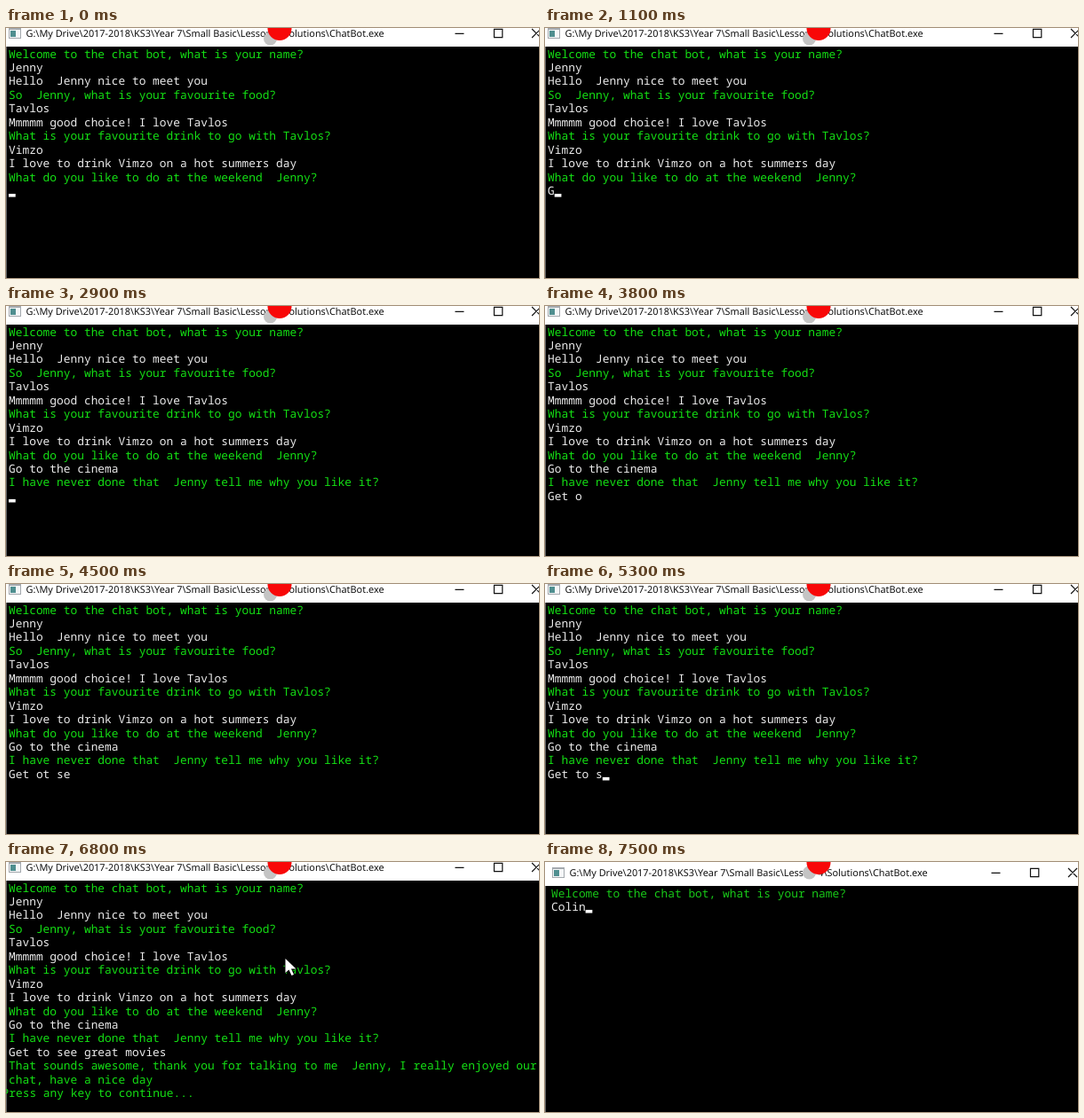
Animation of 600 by 282 pixels, one loop 7600 ms. Source, as an HTML page with a canvas:

```html
<!DOCTYPE html>
<html lang="en">
<head>
<meta charset="utf-8">
<title>Chat bot console</title>
<style>
  html, body { margin: 0; width: 100%; height: 100%; overflow: hidden; background: #000; }
  canvas { display: block; }
</style>
</head>
<body>
<canvas id="stage" width="600" height="282"></canvas>
<script>
const ctx = document.getElementById('stage').getContext('2d');
const LOOP = 7600, CELL = 7.72, ROW = 15.45;
const RESTART = 6900, BLINK = 1060, BLINK_START = 700;
const WHITE = '#ececec';

const TITLE = 'G:\\My Drive\\2017-2018\\KS3\\Year 7\\Small Basic\\Lesson 4\\Solutions\\ChatBot.exe';
const GREETING = '>Welcome to the chat bot, what is your name?';

// Lines starting with ">" are spoken by the bot in green.
const HISTORY = [
  GREETING,
  'Jenny',
  'Hello  Jenny nice to meet you',
  '>So  Jenny, what is your favourite food?',
  'Tavlos',
  'Mmmmm good choice! I love Tavlos',
  '>What is your favourite drink to go with Tavlos?',
  'Vimzo',
  'I love to drink Vimzo on a hot summers day',
  '>What do you like to do at the weekend  Jenny?'
];

const POINTER = new Path2D('M0 0V16L4 12.5L7 19L9.5 18L6.5 11.5H12Z');

// Piecewise linear value through [time, value] points.
function ramp(t, points) {
  if (t <= points[0][0]) return points[0][1];
  for (let i = 1; i < points.length; i++) {
    const [t0, v0] = points[i - 1], [t1, v1] = points[i];
    if (t < t1) return v0 + (v1 - v0) * (t - t0) / (t1 - t0);
  }
  return points[points.length - 1][1];
}

const typed = (text, t, ...points) => text.slice(0, Math.floor(ramp(t, points)));

function linesAt(t) {
  if (t >= RESTART) return [GREETING, typed('Colin', t, [7000, 0], [7450, 5])];

  const lines = [...HISTORY, typed('Go to the cinema', t, [1000, 0], [2100, 11.4], [2400, 16])];
  if (t < 2500) return lines;

  lines.push('>I have never done that  Jenny tell me why you like it?');
  lines.push(t < 5000
    ? typed('Get ot se', t, [3100, 0], [4350, 9], [4600, 9], [5000, 4])
    : typed('Get to see great movies', t, [5000, 4], [6150, 23]));
  if (t < 6400) return lines;

  return lines.concat(
    '>That sounds awesome, thank you for talking to me  Jenny, I really enjoyed our',
    '>chat, have a nice day',
    '>Press any key to continue...');
}

function rect(color, x, y, w, h) {
  ctx.fillStyle = color;
  ctx.fillRect(x, y, w, h);
}

function disc(color, x, y, r) {
  ctx.fillStyle = color;
  ctx.beginPath();
  ctx.arc(x, y, r, 0, Math.PI * 2);
  ctx.fill();
}

function drawTitleBar(restarted) {
  const dx = restarted ? 5 : 0, dy = restarted ? 6 : 0, bx = restarted ? -3 : 0;
  rect('#fff', 0, 0, 600, 21 + dy);

  rect('#a4a9ae', 3 + dx, dy, 14, 12);
  rect('#f4f6f7', 4 + dx, 2 + dy, 12, 9);
  rect('#4f8f90', 5 + dx, 3 + dy, 6, 7);

  ctx.font = '500 10.9px "Noto Sans", sans-serif';
  ctx.fillStyle = '#111';
  ctx.fillText(TITLE, 22.5 + dx, 10 + dy);

  ctx.strokeStyle = '#111';
  ctx.lineWidth = 1.2;
  ctx.beginPath();
  ctx.moveTo(505.5 + bx, 6.3 + dy);
  ctx.lineTo(515.5 + bx, 6.3 + dy);
  ctx.rect(549.5 + bx, 1.3 + dy, 9.3, 9.3);
  ctx.moveTo(592 + bx, 1 + dy);
  ctx.lineTo(602 + bx, 11 + dy);
  ctx.moveTo(602 + bx, 1 + dy);
  ctx.lineTo(592 + bx, 11 + dy);
  ctx.stroke();

  disc('#c4c4c4', 297.5, 12, 7.5);
  disc('#f80808', 308, 0.5, 13.5);
}

function drawConsole(t, restarted) {
  const lines = linesAt(t);
  const left = restarted ? 7 : 3, top = restarted ? 39.5 : 33.5;
  const green = restarted ? '#18c818' : '#14e014';
  ctx.font = '500 12.87px "Noto Sans Mono", monospace';

  lines.forEach((line, row) => {
    const bot = line[0] === '>';
    const x = line.startsWith('>Press') ? -4.5 : left;
    ctx.fillStyle = bot ? green : WHITE;
    [...(bot ? line.slice(1) : line)].forEach((ch, col) =>
      ctx.fillText(ch, x + col * CELL, top + row * ROW));
  });

  const last = lines[lines.length - 1];
  const lit = (t - BLINK_START + BLINK) % BLINK < BLINK / 2;
  if (lit && last[0] !== '>') {
    const y = top + (lines.length - 1) * ROW;
    rect('#fff', left + last.length * CELL, y - 1, CELL, 3.6);
  }
}

function drawPointer(t) {
  if (t < 6600 || t >= RESTART) return;
  ctx.save();
  ctx.translate(ramp(t, [[6600, 330], [6800, 314.5]]), ramp(t, [[6600, 282], [6800, 109]]));
  ctx.fillStyle = '#fff';
  ctx.strokeStyle = '#000';
  ctx.stroke(POINTER);
  ctx.fill(POINTER);
  ctx.restore();
}

function draw() {
  const t = performance.now() % LOOP;
  const restarted = t >= RESTART;
  ctx.textRendering = 'geometricPrecision';
  rect('#000', 0, 0, 600, 282);
  rect('#666', 0, 0, 1, 282);
  drawTitleBar(restarted);
  drawConsole(t, restarted);
  drawPointer(t);
  requestAnimationFrame(draw);
}
draw();
</script>
</body>
</html>
```
